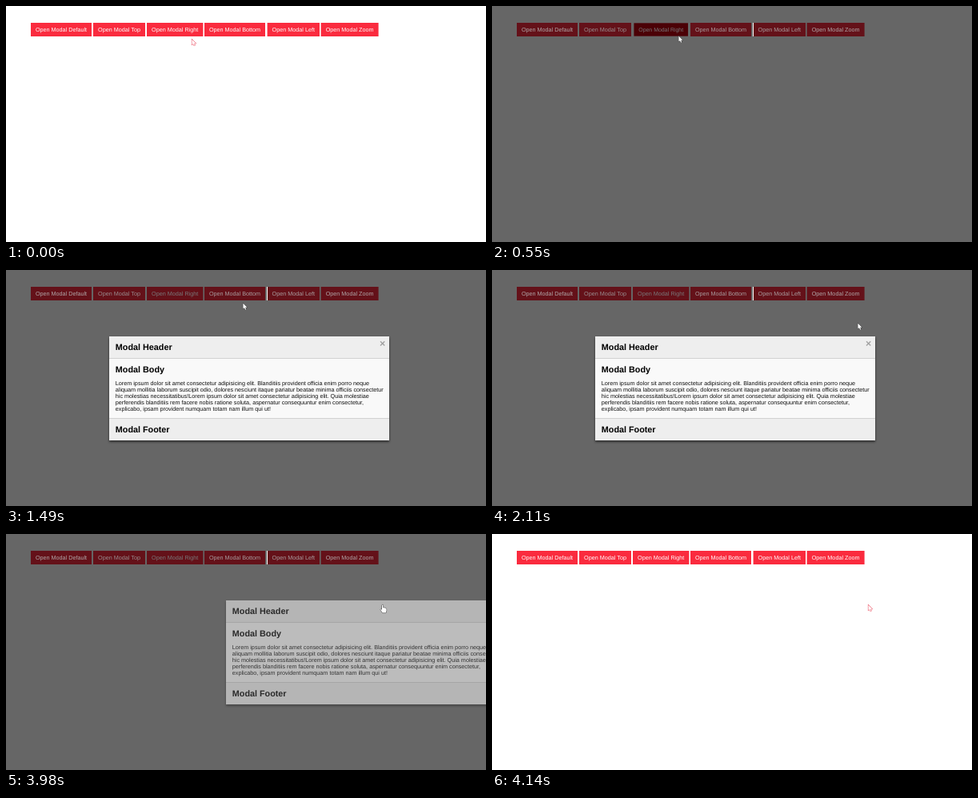
Animation of 600x295 px, one loop 4280 ms. Source, as an HTML page:

```html
<!DOCTYPE html>
<html lang="en">
<head>
<meta charset="utf-8">
<title>Modal demo</title>
<style>
  html, body { margin: 0; width: 100%; height: 100%; overflow: hidden; background: #fff; }
  svg { display: block; width: 600px; height: 295px; }
  text { font: 7.22px Arial, "Liberation Sans", sans-serif; text-rendering: geometricPrecision; white-space: pre; }
  .head { font-size: 10.8px; font-weight: bold; }
  .close { font-size: 12.4px; font-weight: bold; }
  #cursor path { paint-order: stroke; }
</style>
</head>
<body>
<svg viewBox="0 0 600 295" xmlns="http://www.w3.org/2000/svg">
  <defs>
    <filter id="blur" x="-5%" y="-10%" width="110%" height="120%"><feGaussianBlur stdDeviation="1.8"/></filter>
  </defs>
  <rect width="600" height="295" fill="#fff"/>
  <g id="boxes"></g>
  <rect id="shade" width="600" height="295" opacity=".6"/>
  <rect id="gap" x="326" y="21" width="1" height="17" fill="#fff"/>
  <g id="labels"></g>
  <g id="modal">
    <rect x="129" y="84.8" width="350" height="130" fill="#000" opacity=".6" filter="url(#blur)"/>
    <rect x="129" y="83" width="350" height="130" fill="#eee"/>
    <rect x="129" y="110" width="350" height="75.5" fill="#f9f9f9"/>
    <path d="M129 110.5H479M129 185.5H479" stroke="#d2d2d2"/>
    <text class="head" x="136.8" y="100.2">Modal Header</text>
    <text class="head" x="136.8" y="127.6">Modal Body</text>
    <text class="head" x="136.8" y="202.6">Modal Footer</text>
    <g id="copy" fill="#111"></g>
    <text class="close" id="close" x="467" y="95.5">×</text>
  </g>
  <g id="cursor" stroke-width="1" stroke-linejoin="round" fill="#fff">
    <path id="arrow" d="M.4 .4V7.6L2 6.2L3.1 8.7L4.2 8.2L3.2 5.8H5.4Z"/>
    <path id="hand" d="M0 1.3Q0 .4 .7 .4T1.4 1.3V4.2Q2.5 3.7 2.9 4.5Q3.9 4.1 4.3 4.9Q5.6 4.7 5.6 6V7.8Q5.6 9 4.8 10.6H.6Q0 9.2 -1.6 7.3Q-2 6.5 -1.5 6.1Q-.9 5.8 0 6.8Z"/>
  </g>
</svg>
<script>
const LOOP = 4280;
const PRESS = 490, OPEN = 550, SLIDE = 700, CLOSED = 4140;
const HOVERED = 2;
const $ = id => document.getElementById(id);

// name, left, width, dimmed label colour
const buttons = [
  ["Default", 31, 76, "#b0a8aa"],
  ["Top", 109, 65, "#988e90"],
  ["Right", 176, 70.4, "#78787a"],
  ["Bottom", 248, 76, "#a89ea0"],
  ["Left", 326.6, 65.4, "#a89ea0"],
  ["Zoom", 393.6, 72, "#b0a8aa"]
];

const lines = [
  "Lorem ipsum dolor sit amet consectetur adipisicing elit. Blanditiis provident officia enim porro neque",
  "aliquam mollitia laborum suscipit odio, dolores nesciunt itaque pariatur beatae minima officiis consectetur",
  "hic molestias necessitatibus!Lorem ipsum dolor sit amet consectetur adipisicing elit. Quia molestiae",
  "perferendis blanditiis rem facere nobis ratione soluta, aspernatur consequuntur enim consectetur,",
  "explicabo, ipsam provident numquam totam nam illum qui ut!"
];

$("boxes").innerHTML = buttons.map(([, x, w]) =>
  `<rect x="${x}" y="21" width="${w}" height="17"/>`).join("");
$("labels").innerHTML = buttons.map(([name, x, w]) =>
  `<text x="${x + w / 2}" y="32.2" text-anchor="middle">Open Modal ${name}</text>`).join("");
$("copy").innerHTML = lines.map((s, i) =>
  `<text x="136.8" y="${144 + i * 8.1}">${s}</text>`).join("");

// Pointer moves: first step, last step, step count, end point, easing power
const moves = [
  [90, 320, 4, 233, 37, .6],
  [1020, 1490, 7, 296, 41, 1.6],
  [1570, 2030, 7, 424, 63, 1.3],
  [2110, 2110, 1, 457, 66, 1],
  [2260, 2570, 5, 469.5, 82, .7],
  [2800, 2800, 1, 470, 82, 1],
  [2950, 3130, 3, 470, 87, .7],
  [3280, 3280, 1, 470, 88, 1]
];

function pointer(t) {
  let x = 232, y = 41;
  for (const [from, to, n, ex, ey, power] of moves) {
    if (t < from) break;
    const k = n > 1 ? Math.min(n, Math.floor((t - from) / (to - from) * (n - 1) + .02) + 1) : 1;
    const p = (k / n) ** power;
    x += (ex - x) * p;
    y += (ey - y) * p;
  }
  return [x, y];
}

// Value of the last [time, value] pair reached
const hold = (t, steps) => steps.reduce((v, s) => t >= s[0] ? s[1] : v, steps[0][1]);

const slides = [[0, 350], [SLIDE, 56], [790, 0], [3980, 146], [4060, 290], [CLOSED, 350]];

const show = (id, on) => $(id).setAttribute("display", on ? "inline" : "none");

function draw(t) {
  const dim = t >= OPEN && t < CLOSED;
  const slide = hold(t, slides);
  const [x, y] = pointer(t);
  const hover = t < SLIDE && y < 38.5;
  const onClose = dim && y > 85;
  const hand = onClose || (hover && !dim);

  show("shade", dim);
  show("gap", dim);
  buttons.forEach(([, bx, w, dimmed], i) => {
    const lit = hover && i === HOVERED;
    const cx = bx + w / 2;
    const scale = lit && t >= PRESS ? `translate(${cx} 29.5) scale(.96) translate(${-cx} -29.5)` : "";
    const box = $("boxes").children[i], label = $("labels").children[i];
    box.setAttribute("fill", lit ? "#bd0010" : "#fa2b3e");
    box.setAttribute("transform", scale);
    label.setAttribute("fill", dim ? dimmed : "#fff");
    label.setAttribute("transform", scale);
  });

  show("modal", slide < 350);
  $("modal").setAttribute("transform", `translate(${slide} 0)`);
  $("modal").setAttribute("opacity", 1 - slide / 350);
  $("close").setAttribute("fill", onClose ? "#333" : "#a0a0a0");

  $("cursor").setAttribute("transform", `translate(${x} ${y})`);
  $("cursor").setAttribute("stroke", dim ? "#333" : hand ? "#600" : "#e8344a");
  show("arrow", !hand);
  show("hand", hand);
}

const start = performance.now();
function tick() {
  draw((performance.now() - start) % LOOP);
  requestAnimationFrame(tick);
}
draw(0);
requestAnimationFrame(tick);
</script>
</body>
</html>
```
